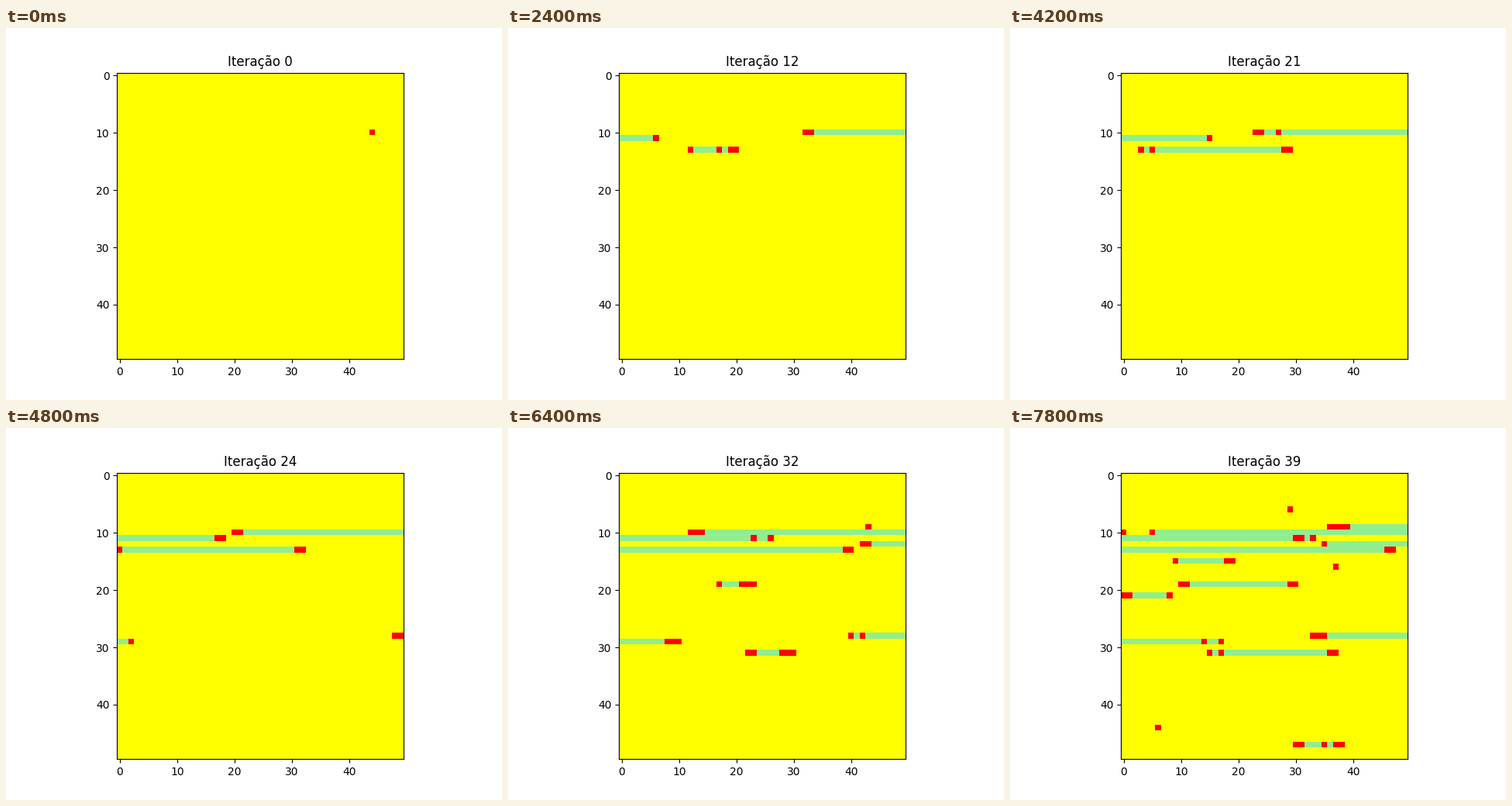
Recreate the animation shown at these times as a matplotlib script. Size 640x480 px, loop 8 s.

```python
import numpy as np
import matplotlib.pyplot as plt
from matplotlib.animation import FuncAnimation
from matplotlib.colors import ListedColormap

SIDE = 50
CELLS = SIDE * SIDE
STEPS = 40
RECOVERY_CHANCE = 0.5

# Outbreaks as (row, column, start step).
OUTBREAKS = [(10, 44, 0), (13, 16, 8), (29, 0, 22), (31, 26, 28),
             (19, 20, 29), (9, 43, 32), (15, 14, 34), (21, 4, 35),
             (47, 34, 35), (6, 29, 39), (16, 37, 39), (44, 6, 39)]


def infection_steps():
    """The grid is one ring read row by row; fronts move one cell per step."""
    cells = np.arange(CELLS)
    steps = np.full(CELLS, CELLS)
    for row, col, start in OUTBREAKS:
        gap = np.abs(cells - (row * SIDE + col))
        steps = np.minimum(steps, start + np.minimum(gap, CELLS - gap))
    return steps


rng = np.random.default_rng(7)
infected = infection_steps()
recovered = infected + rng.geometric(RECOVERY_CHANCE, CELLS)


def grid(step):
    """0 healthy, 1 ill, 2 recovered."""
    state = (infected <= step).astype(int) + (recovered <= step)
    return state.reshape(SIDE, SIDE)


fig, ax = plt.subplots(figsize=(6.4, 4.8), dpi=100)
colors = ListedColormap(["yellow", "red", "lightgreen"])
image = ax.imshow(grid(0), cmap=colors, vmin=0, vmax=2)
title = ax.set_title("Iteração 0")


def update(step):
    image.set_data(grid(step))
    title.set_text(f"Iteração {step}")
    return image, title


anim = FuncAnimation(fig, update, frames=STEPS, interval=200, repeat=True,
                     repeat_delay=0, blit=False)
plt.show()
```
